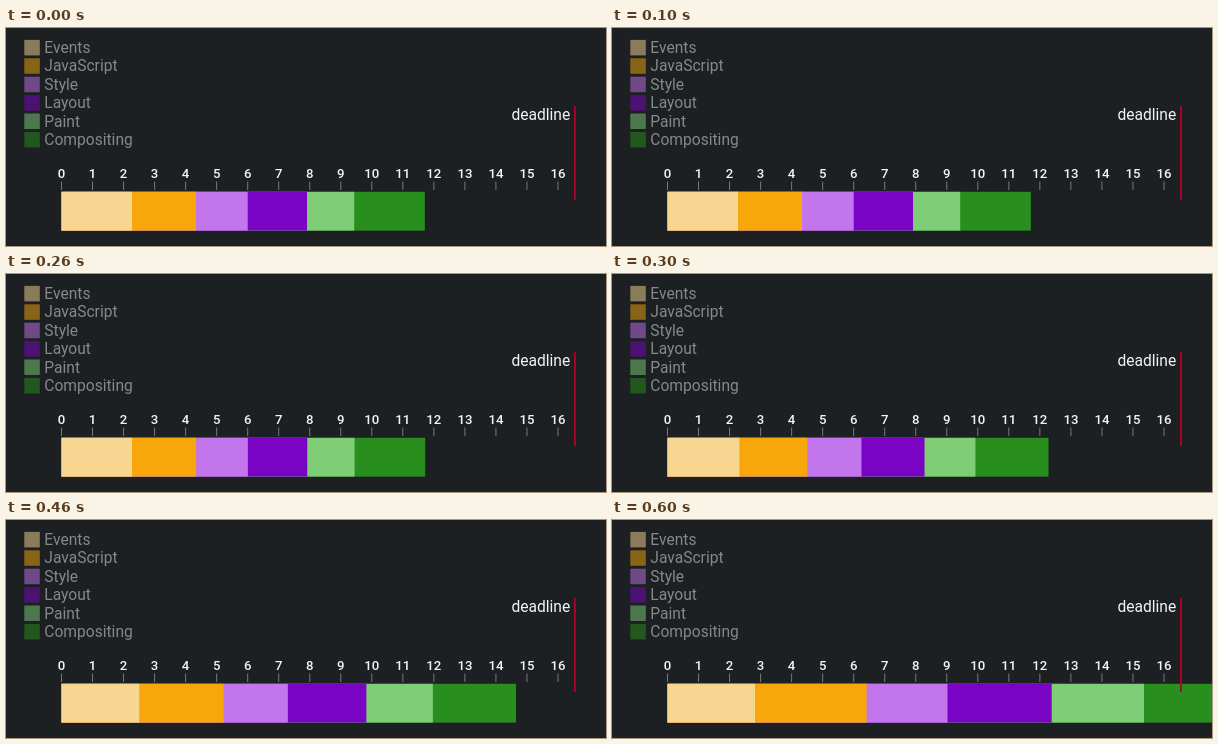
An HTML page with a canvas that plays this animation: 600 by 218 pixels, repeating every 0.7 s.

```html
<!DOCTYPE html>
<html lang="en">
<head>
<meta charset="utf-8">
<title>Frame budget</title>
<style>
  html, body { margin: 0; width: 100%; height: 100%; overflow: hidden; background: #1c2023; }
  canvas { display: block; width: 600px; height: 218px; }
</style>
</head>
<body>
<canvas id="stage"></canvas>
<script>
const W = 600, H = 218;
const canvas = document.getElementById('stage');
const ctx = canvas.getContext('2d');
const dpr = window.devicePixelRatio || 1;
canvas.width = W * dpr;
canvas.height = H * dpr;
ctx.scale(dpr, dpr);

// Each phase: label, colour, right edge before and after growth
const phases = [
  ['Events',      '#f8d591', 126,   143],
  ['JavaScript',  '#f8a70a', 190,   254.6],
  ['Style',       '#c375ec', 241.7, 335.5],
  ['Layout',      '#7b04c4', 301,   439.7],
  ['Paint',       '#7fce77', 348.2, 532],
  ['Compositing', '#288f1f', 418.8, 632],
];

const AXIS_X = 55.5, UNIT = 31.03;
const STEP = 100;
const growth = [0, 0, 0.002, 0.083, 0.428, 0.918, 1];
const LOOP = STEP * growth.length;

function box(x, y, w, h, color) {
  ctx.fillStyle = color;
  ctx.fillRect(x, y, w, h);
}

function label(text, x, y, font, color, align) {
  ctx.font = font + ' Roboto, sans-serif';
  ctx.textAlign = align;
  ctx.fillStyle = color;
  ctx.fillText(text, x, y);
}

function drawLegend() {
  ctx.globalAlpha = 0.5;
  phases.forEach(([name, color], i) => {
    const y = 11.9 + i * 18.4;
    box(18.3, y, 15.5, 15.5, color);
    label(name, 38.3, y + 13.1, '15.6px', '#f0f0f0', 'left');
  });
  ctx.globalAlpha = 1;
}

function drawAxis() {
  for (let i = 0; i <= 16; i++) {
    const x = AXIS_X + i * UNIT;
    label(i, x, 150, '500 13.2px', '#f4f4f4', 'center');
    box(x - 0.5, 153.5, 1, 8.5, '#77797b');
  }
}

// Painted longest first, so neighbours overlap without seams
function drawBar(p) {
  for (const [, color, from, to] of [...phases].reverse()) {
    const right = from + (to - from) * p;
    box(AXIS_X, 163.8, right - AXIS_X, 38.8, color);
  }
}

function drawDeadline() {
  label('deadline', 564.2, 92.2, '15.6px', '#f4f4f4', 'right');
  box(568, 78, 1.8, 94, '#ac0329');
}

function draw(time) {
  const step = Math.floor((time % LOOP) / STEP);
  box(0, 0, W, H, '#1c2023');
  drawLegend();
  drawAxis();
  drawBar(growth[step]);
  drawDeadline();
}

const start = performance.now();
function tick() {
  draw(performance.now() - start);
  requestAnimationFrame(tick);
}
tick();
</script>
</body>
</html>
```
